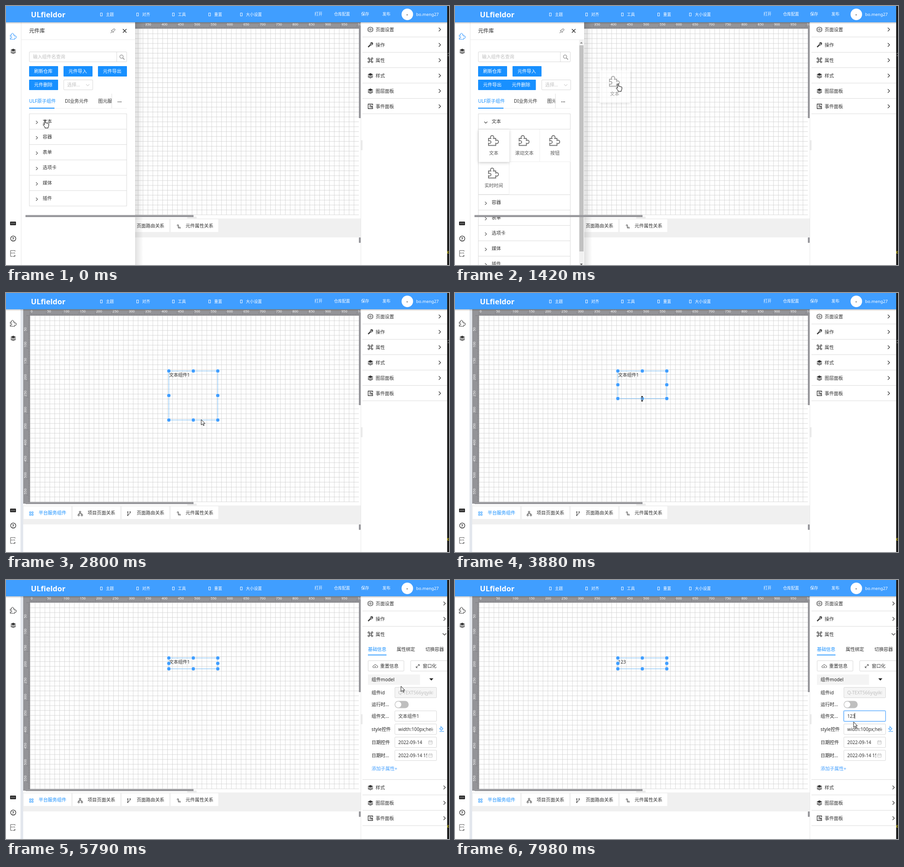
Recreate the animation shown at these times as an HTML page. Size 978x573 px, loop 8 s.

```html
<!DOCTYPE html>
<html lang="zh">
<head>
<meta charset="utf-8">
<style>
html, body { margin: 0; width: 100%; height: 100%; overflow: hidden; background: #fff; }
svg { display: block; width: 100%; height: 100%; }
text { font-family: "Noto Sans", "Noto Sans CJK SC", "Noto Sans CJK", sans-serif; white-space: pre; }
</style>
</head>
<body>
<svg id="stage" viewBox="0 0 978 573"></svg>
<script>
const LOOP = 8000, BLUE = '#1890ff', SKY = '#409eff', INK = '#333', LINE = '#dcdcdc';
const UNIT = 36.1; // pixels per 50 ruler units

// Drawing helpers
const T = (x, y, s, size = 10.2, fill = INK, more = '') =>
  `<text x="${x}" y="${y + size * 0.36}" font-size="${size}" fill="${fill}" ${more}>${s}</text>`;
const R = (x, y, w, h, fill, more = '') =>
  `<rect x="${x}" y="${y}" width="${w}" height="${h}" fill="${fill}" ${more}/>`;
const P = (d, stroke = INK, w = 1, fill = 'none', more = '') =>
  `<path d="${d}" stroke="${stroke}" stroke-width="${w}" fill="${fill}" ${more}/>`;
const C = (x, y, r, fill, more = '') => `<circle cx="${x}" cy="${y}" r="${r}" fill="${fill}" ${more}/>`;
const G = (x, y, body, more = '') => `<g transform="translate(${x} ${y}) ${more}">${body}</g>`;
const box = (id, ...r) => `<clipPath id="${id}">${R(...r, '#000')}</clipPath>`;
const clip = (id, body) => `<g clip-path="url(#${id})">${body}</g>`;
const range = (n, f) => Array.from({ length: n }, (_, i) => f(i)).join('');
const hline = (x1, x2, y, color = LINE) => P(`M${x1} ${y}H${x2}`, color);
const chevron = (x, y, turn = 0, s = 1) => G(x, y, P('M-2-4L2 0L-2 4', INK, 1.2), `rotate(${turn}) scale(${s})`);
const frame = (x, y, w, h, stroke = '#d9d9d9', fill = '#fff') =>
  R(x + .5, y + .5, w - 1, h - 1, fill, `stroke="${stroke}" rx="1.5"`);
const bold = 'font-weight="500"';

// Last row of a stepped table at or before t
const at = (rows, t) => rows.filter(r => r[0] <= t).pop();

// Icons, centred on 0,0
const puzzle = (x, y, s, color, w) => G(x, y, P(
  'M-10-4.5H-5C-7-7-5-11-2-11S3-7 1-4.5H6V0C9-1.8 12 0 12 3S9 8 6 6.2V11H-10V6C-7 7.5-4.5 6-4.5 3.5S-7-.5-10 1Z',
  color, w), `scale(${s})`);
const layers = (x, y) => G(x, y,
  P('M0-5.5L6-2.5L0 .5L-6-2.5Z', 'none', 0, INK) + P('M-5.5 0L0 2.8L5.5 0M-5.5 2.6L0 5.4L5.5 2.6', INK, 1.2));
const gear = (x, y) => G(x, y, P('M-2-5H2L3-3.5H5L5.5-1L4.5 0L5.5 1L5 3.5H3L2 5H-2L-3 3.5H-5L-5.5 1L-4.5 0L-5.5-1L-5-3.5H-3Z', INK, 1.1)
  + C(0, 0, 1.8, 'none', `stroke="${INK}"`));
const wrench = (x, y) => G(x, y, P('M-5 4L0-1C-1-4 2-6 4-5L2-3L3-2L5-4C6-2 4 1 1 0L-4 5Z', INK, 1.2));
const command = (x, y) => G(x, y, P('M-2-2H2V2H-2ZM-2-2H-4A1.7 1.7 0 1 1-2-4ZM2-2V-4A1.7 1.7 0 1 1 4-2ZM2 2H4A1.7 1.7 0 1 1 2 4ZM-2 2V4A1.7 1.7 0 1 1-4 2Z', INK, 1.2));
const events = (x, y) => G(x, y, P('M5-2V-5H-5V5H5V3M-2-2H2M-2 1H5M3-1L5 1L3 3', INK, 1.3));
const lens = (x, y) => G(x, y, C(-1, -1, 3.8, 'none', 'stroke="#777"') + P('M2 2L5.5 5.5', '#777', 1.2));
const calendar = (x, y) => G(x, y, P('M-4-3H4V4H-4ZM-4-.5H4M-2-4.5V-2M2-4.5V-2', '#bbb', .9));

const stretch = P('M0-7L3-3.5H.8V3.5H3L0 7L-3 3.5H-.8V-3.5H-3Z', '#fff', .6, '#000');
const cursors = {
  hand: P('M-1 1C-1-.6 1.4-.6 1.4 1V6C2 4.8 3.6 5.2 3.6 6.6C5 5.2 6 6 6 7.2C7.4 6 8.4 7 8.4 8V12L7 15V17H0V15L-4 10C-4 8-2.4 8-1 10Z', '#000', 1, '#fff'),
  arrow: P('M0 0V12L2.8 9.4L4.8 13.6L6.6 12.8L4.7 8.8H8.4Z', '#000', .9, '#fff'),
  ns: stretch,
  nwse: G(0, 0, stretch, 'rotate(-45)'),
  beam: P('M-2.5-6H-.5L0-5.5L.5-6H2.5M0-5.5V5.5M-2.5 6H-.5L0 5.5L.5 6H2.5', '#222')
};

// Stepped motion: time, then value(s)
const moves = [
  [0, 86, 253, 'hand'], [430, 87, 262, 'hand'], [565, 90, 285, 'hand'], [700, 93, 303, 'hand'],
  [1000, 135, 284, 'hand'], [1140, 230, 235, 'hand'], [1280, 325, 188, 'hand'], [1420, 360, 172, 'hand'],
  [2530, 357, 173, 'nwse'], [2663, 400, 238, 'arrow'], [2796, 431, 280, 'arrow'], [2930, 427, 280, 'arrow'],
  [3063, 420, 280, 'arrow'], [3195, 414, 281, 'ns'], [3460, 413, 281, 'ns'],
  [3610, 413, 266, 'ns'], [3750, 413, 234, 'ns'], [3890, 413, 204, 'ns'], [4030, 413, 190, 'ns'],
  [4310, 430, 205, 'arrow'], [4445, 560, 262, 'arrow'], [4580, 740, 225, 'arrow'],
  [4715, 847, 140, 'arrow'], [4850, 840, 119, 'hand'],
  [5533, 850, 170, 'arrow'], [5667, 872, 235, 'arrow'], [5801, 895, 285, 'arrow'], [5936, 914, 300, 'beam'],
  [6330, 900, 302, 'beam'], [6470, 868, 302, 'beam'], [6610, 840, 302, 'arrow'], [6750, 824, 301, 'arrow'],
  [7160, 850, 309, 'arrow'], [7295, 872, 313, 'arrow'], [7430, 880, 314, 'arrow']
];
const treeOpen = [[0, 0], [160, 20], [295, 120], [430, 145]];
const slide = [[0, 0], [1850, 107.5], [1980, 222], [2110, 248], [2240, 400]];
const boxHeight = [[0, 108.5], [3610, 93], [3750, 61], [3890, 31], [4030, 18], [4310, 24]];
const propOpen = [[0, 0], [5130, 11], [5264, 200], [5398, 305]];
const label = [[0, '文本组件1'], [7430, '1'], [7700, '12'], [7980, '123']];
const selected = [[0, 0], [6330, 13], [6470, 44], [6610, 47], [7430, 0]];

function canvasArea() {
  let s = R(32, 36, 6, 537, '#e3e7ed') + R(38, 36, 745, 14, '#949498') + R(38, 36, 15, 430, '#949498')
    + R(53, 50, 726, 412, '#fff');
  const cell = UNIT * .3;
  let grid = '', ticks = '';
  for (let x = 53.4; x < 779; x += cell) grid += `M${x} 50V462`;
  for (let y = 50.4; y < 462; y += cell) grid += `M53 ${y}H779`;
  for (let i = 0; i < 202; i++) {
    const d = i * UNIT / 10, len = i % 10 ? 4 : 8;
    ticks += `M${53 + d} ${50 - len}V50`;
    if (d < 414) ticks += `M${53 - len} ${50 + d}H53`;
  }
  s += P(grid, '#ccc', .75) + P(ticks, '#747479', .7);
  s += range(21, k => T(54.6 + k * UNIT, 40, k * 50, 7.6, '#fff'));
  s += range(11, k => G(42.5, 84.5 + k * UNIT, T(0, 0, (k + 1) * 50, 7.6, '#fff'), 'rotate(-90)'));
  return clip('work', s) + R(779, 50, 4, 416, '#fff') + R(779, 50, 4, 198, '#98989c');
}

function bottomArea() {
  let s = R(38, 467, 745, 106, '#fff') + R(38, 470, 745, 42, '#f0f0f0') + R(400, 466, 21, 4, '#ececec');
  ['平台服务组件', '项目页面关系', '页面路由关系', '元件属性关系'].forEach((name, i) => {
    const x = 39 + i * 108.2;
    s += R(x, 472, 105, 28, '#fff') + T(x + 33, 486, name, 10.2, i ? INK : BLUE);
  });
  s += P('M52 484H55V487H52ZM57 484H60V487H57ZM52 489H55V492H52ZM57 489H60V492H57Z', BLUE, .9);
  s += P('M162 483H165V486H162ZM159 490H162V493H159ZM166 490H169V493H166ZM163.5 486V488M160.5 490V488H167.5V490', INK, .9);
  s += P('M269 485V492M274 485V487Q274 489 269 490', INK) + C(269, 484.5, 1.2, INK) + C(274, 484.5, 1.2, INK) + C(269, 492, 1.2, INK);
  s += P('M378 486A1.6 1.6 0 1 1 379 487Q382 487 380 490Q380 492 382 491A1.5 1.5 0 1 1 383 492', INK);
  return s + R(779, 512, 4, 12, '#98989c', 'rx="1"');
}

function header() {
  let s = R(0, 36, 974, 4, 'url(#drop)') + R(0, 0, 974, 36, SKY);
  s += T(55, 19, 'ULfieldor', 16.5, '#fff', 'font-weight="700"');
  [[208, '主题'], [288, '对齐'], [367, '工具'], [447, '重置'], [517, '大小设置']].forEach(([x, name]) => {
    s += R(x + .5, 15.5, 4, 6.5, 'none', 'stroke="#fff" stroke-width=".9"') + T(x + 12.5, 18.5, name, 8.9, '#fff', bold);
  });
  [[681, '打开'], [724, '仓库配置'], [784, '保存'], [831, '发布']].forEach(([x, name]) => {
    s += T(x, 18, name, 8.9, '#fff', bold);
  });
  return s + C(886, 18.5, 12.7, '#fff') + T(884, 18, '-', 10, INK, 'font-weight="700"') + T(905.5, 19, 'bo.meng27', 9.3, '#fff');
}

function rail(t) {
  return R(0, 36, 32, 537, '#fff') + puzzle(15.6, 67, .62, t < 1850 ? SKY : '#444', 1.7) + layers(16, 100)
    + R(9, 477, 13, 8, '#222', 'rx="1"') + P('M11 480H20M11 482H20', '#fff', .9, 'none', 'stroke-dasharray="1 1"')
    + C(16, 514.5, 5.7, 'none', 'stroke="#222" stroke-width="1.2"') + T(13.6, 514.5, '?', 9, '#222', 'font-weight="700"')
    + P('M20 543V541H10V554H15M20 551L16 555M20 551V554H16', '#555') + T(10.5, 547, 'JSON', 4, '#444');
}

const button = (x, y, name) => R(x, y, 64, 23, BLUE, 'rx="1"') + T(x + 11, y + 11.5, name, 10.2, '#fff');

function tree(right, open) {
  let s = R(51.5, 238.5, right - 52, 204 + open, '#fff', `stroke="${LINE}"`);
  ['文本', '容器', '表单', '选项卡', '媒体', '插件'].forEach((name, i) => {
    const y = 238.5 + i * 34 + (i ? open : 0);
    if (i) s += hline(51, right, y);
    s += chevron(68, y + 19, !i && open ? 90 : 0, .85) + T(81, y + 17, name);
  });
  if (!open) return s;
  let items = hline(51, right, 272.5);
  ['文本', '滚动文本', '按钮', '实时时间'].forEach((name, i) => {
    const x = 52 + (i % 3) * 67.6, y = 273 + (i > 2 ? 72 : 0);
    items += P(`M${x + 67.5} ${y}V${y + 71.5}H${x}`, '#eee') + itemFace(x, y, name);
  });
  return s + box('fold', 51, 272, 204, open) + clip('fold', items);
}

const itemFace = (x, y, name) => puzzle(x + 32, y + 24.5, 1, '#777', 1.9)
  + T(x + 33.5, y + 52, name, 10.2, '#555', 'text-anchor="middle"');

const itemCard = opacity => `<g opacity="${opacity}">`
  + R(52, 273, 68, 72, '#fff', 'filter="url(#lift)"') + itemFace(52, 273, '文本') + '</g>';

function drawer(t) {
  const off = at(slide, t)[1];
  if (off > 300) return '';
  const open = at(treeOpen, t)[1], narrow = open > 100, right = narrow ? 255 : 267;
  let s = R(285, 36, 18, 537, 'url(#side)') + R(32, 36, 253, 537, '#fff') + P('M33.5 36V573', '#e8e8e8')
    + T(51, 55, '元件库', 11.6, '#222') + hline(33, 285, 74.5, '#ececec')
    + P('M231 60L234 57M232.5 54.5L236.5 58.5L238 55.5L241 52.5L238.5 50L235.5 53Z', '#444')
    + P('M258 51L266 59M266 51L258 59', '#222', 1.3);
  s += frame(51, 101, right - 51, 23) + P(`M${right - 22.5} 101V124`, '#d9d9d9') + lens(right - 11, 113)
    + T(59.5, 112.5, '输入组件名查询', 10.2, '#bfbfbf');
  const spots = narrow ? [[51, 133], [127, 133], [51, 163], [114.5, 163]] : [[51, 133], [127, 133], [203, 133], [51, 163]];
  ['刷新仓库', '元件导入', '元件导出', '元件删除'].forEach((name, i) => s += button(...spots[i], name));
  const sx = narrow ? 191 : 127;
  s += frame(sx, 163, 65, 23) + T(sx + 8, 174.5, '选择...', 10.2, '#bfbfbf') + P(`M${sx + 50} 173L${sx + 53.5} 177L${sx + 57} 173`, '#bfbfbf');
  s += hline(51, right, 226.5, '#f0f0f0') + R(51, 225, 56, 2, BLUE) + T(51, 210, 'ULF原子组件', 10.2, BLUE)
    + T(130, 210, 'DI业务元件') + T(203.5, 210, narrow ? '图元' : '图元服')
    + R(right - 34, 194, 40, 32, '#fff') + P(`M${right - 33.5} 194V226`, '#e2e2e2') + T(right - 21, 209, '...', 11, INK, 'font-weight="600"');
  s += tree(right, open);
  if (t >= 700 && t < 1850) s += itemCard(1);
  if (narrow) s += R(274, 75, 10, 498, '#f1f1f1') + R(274.5, 87, 9.5, 456, '#c1c1c1')
    + P('M276 83L279 79.5L282 83Z', 'none', 0, '#888') + P('M276 570L279 573L282 570Z', 'none', 0, '#444');
  return clip('work', G(-off, 0, s));
}

function component(t) {
  if (t < 1850) return '';
  const h = at(boxHeight, t)[1], x = 359.5, y = 172.5, w = 108;
  let s = T(x + .5, 181, at(label, t)[1], 10) + R(x, y, w, h, 'none', 'stroke="#7fc1f8" stroke-width="1.1"');
  for (let i = 0; i < 9; i++)
    if (i !== 4) s += C(x + (i % 3) * w / 2, y + Math.floor(i / 3) * h / 2, 4.1, SKY, 'stroke="#fff" stroke-width=".8"');
  return s;
}

const caption = (y, name) => T(807, y, name, 10.2, '#222', bold);
const field = (y, name, value, more = '') =>
  caption(y, name) + frame(858, y - 12, 93, 24) + clip('value', T(866, y, value, 10.1)) + more;

function properties(t) {
  const mark = at(selected, t)[1], text = at(label, t)[1];
  let s = T(799, 153, '基础信息', 10.2, BLUE) + R(799, 165, 41, 1.6, BLUE) + T(862.5, 153, '属性绑定') + T(926, 153, '切换容器');
  s += frame(799, 178, 80, 24) + T(826, 190, '重置信息') + P('M813 194H811.5A2.3 2.3 0 0 1 812 189.5A3.5 3.5 0 0 1 818.5 189.5A2.3 2.3 0 0 1 819 194H817.5M815 195V191M813.5 192.5L815 191L816.5 192.5', INK, .9);
  s += frame(893, 178, 84, 24) + T(920, 190, '窗口化') + P('M906 193.5L912 187.5M909.5 187H912.5V190M905.5 191V194H908.5', INK);
  s += R(799, 209, 115, 23, '#f4f4f4') + caption(220, '组件model') + P('M934.5 217.5H943.5L939 222.5Z', 'none', 0, '#222');
  s += caption(249, '组件id') + frame(858, 237, 93, 24, '#d9d9d9', '#f5f5f5') + clip('value', T(866, 249, 'Q-TEXT566yqyik0', 10.1, '#bfbfbf'));
  s += caption(275, '运行时...') + R(858, 267.5, 31, 16, '#bfbfbf', 'rx="8"') + C(866, 275.5, 6.7, '#fff');
  s += field(301, '组件文...', '');
  if (t >= 6190) s += R(856.5, 288, 95, 26, '#d5eaff', 'rx="2"') + frame(858, 289, 93, 24, SKY);
  s += T(866, 301, text, 10.1);
  if (mark) s += box('mark', 913 - mark, 293, mark, 16)
    + clip('mark', R(866, 293, 47, 16, '#2a7fdb') + T(866, 301, text, 10.1, '#fff'));
  if (t >= 7430) s += P(`M${866.5 + text.length * 5.4} 294V307`, '#222');
  s += field(330, 'style控件', 'width:100px;heig') + P('M957 329L961 325L965 329L961 333ZM961 325L959 323', BLUE, 1, '#bfe0ff') + hline(957, 967, 335, BLUE);
  s += field(359, '日期控件', '2022-09-14', calendar(937, 359));
  s += field(388, '日期时...', '2022-09-14 15', R(930, 378, 14, 19, '#fff') + calendar(937, 388));
  return s + T(807, 417, '添加子属性+', 10.2, SKY);
}

function sidePanel(t) {
  const open = at(propOpen, t)[1], cx = open ? 968 : 957.5;
  const icons = [gear, wrench, command, layers, layers, events];
  let s = R(783, 36, 191, 537, '#fff') + P('M783.5 36V573', '#e6e6e6') + P('M784.5 297V319M786.5 297V319', '#d5d5d5', .8);
  ['页面设置', '操作', '属性', '样式', '图层面板', '事件面板'].forEach((name, i) => {
    const y = 52 + i * 34 + (i > 2 ? open : 0);
    s += icons[i](804.5, y) + T(816, y, name);
    s += chevron(cx, y, i === 2 && open ? (open < 20 ? 45 : 90) : 0);
    s += hline(787, 974, y + 16.5 + (i === 2 ? open : 0));
  });
  if (open) s += box('props', 787, 137, 187, open - 1) + clip('props', properties(t));
  return clip('side-panel', s);
}

function tooltip(t) {
  if (t < 6750 || t >= 7160) return '';
  const shade = 'rgba(0,0,0,.76)';
  return R(774, 227, 117, 56, shade, 'rx="1.5" filter="url(#lift)"') + P('M828 283H836L832 287Z', 'none', 0, shade)
    + ['text', '数据类型: string', '数据描述: 组件文本数据'].map((s, i) => T(779, 239.5 + i * 16, s, 10.2, '#fff')).join('');
}

function pointer(t) {
  const [, x, y, kind] = at(moves, t);
  const ghost = t >= 1000 && t < 1850 ? G(x - 93, y - 303, itemCard(.6)) : '';
  return ghost + G(x, y, cursors[kind]);
}

const fade = (id, x2, y2, o) =>
  `<linearGradient id="${id}" x2="${x2}" y2="${y2}"><stop stop-opacity="${o}"/><stop offset="1" stop-opacity="0"/></linearGradient>`;
const defs = '<defs>' + fade('drop', 0, 1, .22) + fade('side', 1, 0, .12)
  + '<filter id="lift" x="-30%" y="-30%" width="160%" height="160%"><feDropShadow dx="0" dy="2" stdDeviation="3" flood-opacity=".2"/></filter>'
  + box('work', 32, 36, 751, 537) + box('value', 859, 230, 83.5, 180) + box('side-panel', 783, 36, 191, 537) + '</defs>';

const base = defs + R(0, 0, 978, 573, '#fff') + canvasArea() + bottomArea();
const scrollbar = R(43, 462.5, 371, 4.5, '#98989c');
const bar = header();
const edge = R(974, 0, 4, 573, '#1c1c1c') + P('M975 106L978 104M975 110H978', '#bbb', .8)
  + P('M975 542V548M978 542L975 545L978 548', '#c9b800');

const stage = document.getElementById('stage');
const start = performance.now();
let shown = '';

function draw() {
  const t = (performance.now() - start) % LOOP;
  const view = component(t) + drawer(t) + scrollbar + rail(t) + sidePanel(t) + bar + edge + tooltip(t) + pointer(t);
  if (view !== shown) stage.innerHTML = base + (shown = view);
  requestAnimationFrame(draw);
}
draw();
</script>
</body>
</html>
```
